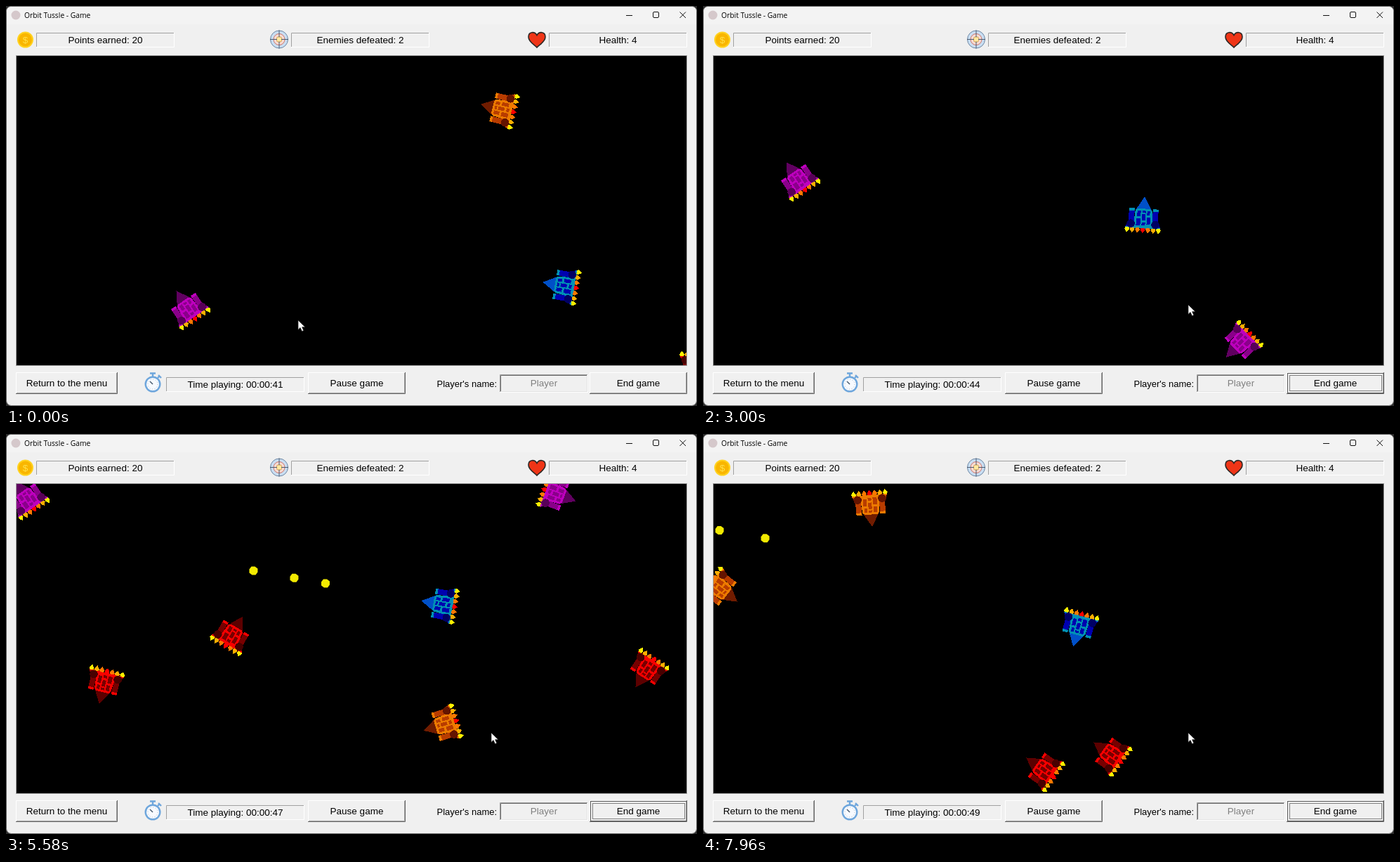
An HTML page that plays this animation: 984x569 px, repeating every 8 s.

```html
<!DOCTYPE html>
<html lang="en">
<head>
<meta charset="utf-8">
<title>Orbit Tussle - Game</title>
<style>
  html, body { margin: 0; width: 100%; height: 100%; overflow: hidden; background: #2b2b2b; }
  svg { display: block; }
  text { font: 13.5px "Liberation Sans", Arial, sans-serif; }
  .title { font: 10.3px "Open Sans", sans-serif; }
  .small { font-size: 13px; }
  .mid { text-anchor: middle; }
  .red    { --pod: #780000; --line: #f60000; --nose: #5c0000; --dark: #480000; }
  .orange { --pod: #b83c00; --line: #ec7a00; --nose: #701c00; --dark: #641400; }
  .purple { --pod: #8a008a; --line: #be00be; --nose: #600060; --dark: #580058; }
  .blue   { --pod: #0000b0; --line: #0090b4; --nose: #0050c8; --dark: #000064; }
</style>
</head>
<body>
<svg width="984" height="569" viewBox="0 0 984 569">
  <defs>
    <clipPath id="space"><rect x="15" y="71" width="954" height="440"/></clipPath>
    <g id="ship" shape-rendering="crispEdges">
      <path fill="var(--nose)" d="M0-26.500L12-6H-12z"/>
      <path fill="var(--pod)" d="M-21-8h8V18h-12l4-9zM21-8h-8V18h12l-4-9z"/>
      <path fill="var(--line)" d="M-21-9h8v3.500h-8zM13-9h8v3.500h-8z"/>
      <path fill="var(--line)" d="M-9-9H9L12-6L14 18H-14L-12-6zM-25 17h50v2h-50z"/>
      <path fill="var(--pod)" d="M-9-6h5v8h-5zM-10 5h6v10h-6zM-2-6h5v3h-5zM-2-1h5v9h-5zM-2 11h5v4h-5zM5-6h4v6h-4zM5 3h5v10h-5z"/>
      <circle cx="-17.500" cy="13" r="5.800" fill="var(--dark)"/>
      <circle cx="17.500" cy="13" r="5.800" fill="var(--dark)"/>
      <g id="flames"></g>
    </g>
  </defs>

  <rect x=".5" y=".5" width="983" height="568" rx="7" fill="#f0f0f0" stroke="#606060"/>
  <path d="M1 26V8q0-7 7-7h968q7 0 7 7v18z" fill="#f3f3f3"/>
  <circle cx="14" cy="13" r="6.500" fill="#d5c8cb"/>
  <text class="title" x="26" y="17">Orbit Tussle - Game</text>
  <g fill="none" stroke="#111">
    <path d="M883 13.500h9M959.500 8.500l8.500 8.500M968 8.500l-8.500 8.500"/>
    <rect x="921.500" y="8.500" width="8" height="8" rx="1.500"/>
  </g>

  <circle cx="27.500" cy="48" r="11.500" fill="#ffd21f"/>
  <circle cx="27.500" cy="48" r="9.500" fill="#f9b600"/>
  <text class="mid" x="27.500" y="53" fill="#ffe04a">$</text>

  <g fill="none">
    <circle cx="389" cy="47.500" r="12.500" fill="#c9def2" stroke="#6b86a3"/>
    <circle cx="389" cy="47.500" r="8" fill="#f5dcd5" stroke="#cf7468"/>
    <circle cx="389" cy="47.500" r="4" fill="#ffe9a0" stroke="#d4a05a"/>
    <path d="M389 34.500v10m0 6v10M376 47.500h10m6 0h10" stroke="#4a5b70"/>
  </g>

  <path d="M756 59C752 54.500 744 51 744 44C744 36 753 36 756 41.500C759 36 768 36 768 44C768 51 760 54.500 756 59z"
        fill="#ef3517" stroke="#2d2825" stroke-width="1.600"/>

  <g stroke="#6ea6dc" fill="none" stroke-width="2.400">
    <path d="M209 527v-4m-4-.5h8M216 529l3-3m-2-1l4 4"/>
    <circle cx="209" cy="538" r="10.300" fill="#f7faff"/>
    <path d="M209 538l-4-4" stroke="#44566b" stroke-width="1.500"/>
    <circle cx="209" cy="538" r="7" stroke="#a8b8c8" stroke-width="1" stroke-dasharray="1 2.660"/>
  </g>

  <g id="controls"></g>
  <text class="small" x="613.500" y="542">Player's name:</text>
  <g id="focus" fill="none">
    <rect x="832.500" y="522.500" width="137" height="28" stroke="#555"/>
    <rect x="835.500" y="525.500" width="131" height="22" stroke="#111" stroke-dasharray="1 1"/>
  </g>

  <rect x="14.500" y="70.500" width="955" height="441" stroke="#a0a0a0"/>
  <g clip-path="url(#space)">
    <g id="shots" fill="#f2ea00"></g>
    <g id="fleet"></g>
  </g>
  <path id="cursor" fill="#fff" stroke="#222" stroke-width=".7" d="M0 0V13.500L3 10.600L5.500 15.700L7.800 14.700L5.600 9.800H10z"/>
</svg>

<script>
const LOOP = 8000, TICK = 1000 / 24;
const $ = id => document.getElementById(id);
const toTick = ms => Math.floor((ms + 3) / TICK) * TICK;

function bevel(x, y, w, h, topLeft, bottomRight) {
  return `<path fill="none" stroke="${topLeft}" d="M${x + .5} ${y + h}V${y + .5}H${x + w}"/>
    <path fill="none" stroke="${bottomRight}" d="M${x} ${y + h - .5}H${x + w - .5}V${y}"/>`;
}
const label = (x, y, text, attrs = '') => `<text class="mid" x="${x}" y="${y}" ${attrs}>${text}</text>`;
const field = (x, y, text, id = '') =>
  bevel(x, y, 197, 21, '#a0a0a0', '#fff') + label(x + 98.5, y + 15, text, id && `id="${id}"`);
const button = (x, w, text) => bevel(x, 521, w, 31, '#fff', '#696969') +
  bevel(x + 1, 522, w - 2, 29, '#f0f0f0', '#a0a0a0') + label(x + w / 2, 541, text);

$('controls').innerHTML =
  field(43, 38, 'Points earned: 20') + field(406, 38, 'Enemies defeated: 2') + field(773, 38, 'Health: 4') +
  field(228, 528, '', 'clock') +
  button(14, 145, 'Return to the menu') + button(430, 139, 'Pause game') + button(831, 139, 'End game') +
  bevel(703, 524, 126, 26, '#a0a0a0', '#fff') + bevel(704, 525, 124, 24, '#696969', '#e3e3e3') +
  label(766, 541, 'Player', 'fill="#808080"');

const flameColors = ['#ff0000', '#ff7800', '#ffae00', '#fff000'];
for (let i = -3; i <= 3; i++) {
  const x = i * 7.5;
  $('flames').innerHTML += `<path fill="${flameColors[Math.abs(i)]}" d="M${x - 3.5} 21l1-2.500h5l1 2.500L${x} 26z"/>`;
}

// Each enemy: colour, moment, nose position then, velocity per second, optional end.
const enemies = [
  ['purple', 0, 243, 406, -41.3, -61],
  ['orange', 0, 677, 140, -152, -35.5],
  ['red', 0, 985, 542, 0, 150],
  ['red', 1380, 113, 139, -65, 189, 1850],
  ['orange', 1380, 33, 237, 85, -98, 1850],
  ['red', 2250, 959, 408, 116, -99],
  ['purple', 2250, 837, 409, -122, 120],
  ['red', 2250, 1020, 484, 106, -106],
  ['orange', 3880, 365, 516, -295, -52, 4600],
  ['orange', 4880, 762, 371, -249, 76],
  ['red', 4880, 167, 243, -51, 210],
  ['red', 4880, 269, 376, 101, -173],
  ['red', 4880, 939, 296, -63, 95],
  ['red', 4880, 180, 516, 197, 155],
  ['purple', 6250, 877, 120, 94, 35],
  ['red', 7960, 461, 461, -123, -86],
  ['red', 7960, 557, 439, -122, -88],
  ['orange', 7960, 241, 131, 9, 100],
  ['orange', 7960, 48, 238, 95, 74]
].map(([color, at, x, y, vx, vy, end = LOOP]) => ({ node: addShip(color), at: toTick(at), x, y, vx, vy, end }));

// Time, x, y, heading in degrees clockwise from up.
const playerPath = [
  [0, 790.6, 397.4, -80], [1375, 797.6, 400.4, -80], [1500, 797.6, 400.4, -80], [2250, 689.6, 380.4, -80],
  [2500, 652, 362, -49], [2800, 628, 326, -17], [3100, 627, 283, 14], [3450, 640, 247, 45],
  [4050, 640, 247, 45], [4500, 626, 243.4, -80], [4850, 620.6, 242.4, -80], [5500, 620.6, 242.4, -80],
  [5900, 590.6, 237.4, -80], [6400, 590.6, 237.4, -80], [6900, 568, 242, -108], [7300, 545, 257, -137],
  [7700, 534, 277, -165], [LOOP, 534, 277, -165]
];
const cursorPath = [[0, 416, 447], [1375, 636, 398], [1900, 691, 425], [LOOP, 691, 425]];
const player = addShip('blue');

// Shots share one line of fire; the values are x positions at 6250 ms.
const shots = [149.5, 207.5, 252, 418, 476, 513, 578].map(x => {
  const node = add('shots', 'path');
  node.setAttribute('d', 'M-3-6H2L6-3V2L3 6H-2L-6 3V-2z');
  return { node, x };
});

function add(parent, tag) {
  return $(parent).appendChild(document.createElementNS('http://www.w3.org/2000/svg', tag));
}
function addShip(color) {
  const node = add('fleet', 'use');
  node.setAttribute('href', '#ship');
  node.setAttribute('class', color);
  return node;
}
function place(node, x, y, angle = 0) {
  node.setAttribute('transform', `translate(${x} ${y}) rotate(${angle})`);
}
function show(node, visible) {
  node.style.display = visible ? '' : 'none';
}
function along(path, t) {
  const i = Math.max(1, path.findIndex(key => key[0] >= t));
  const a = path[i - 1], b = path[i], k = (t - a[0]) / (b[0] - a[0]);
  return a.slice(1).map((v, j) => v + (b[j + 1] - v) * k);
}

function draw(now) {
  const t = toTick(now % LOOP) % LOOP;

  for (const { node, at, x, y, vx, vy, end } of enemies) {
    const s = (t - at) / 1000, speed = Math.hypot(vx, vy);
    place(node, x + vx * s - 25.5 * vx / speed, y + vy * s - 25.5 * vy / speed,
      Math.atan2(vx, -vy) * 180 / Math.PI);
    show(node, t < end);
  }

  const pose = along(playerPath, t);
  place(player, ...pose);
  for (const shot of shots) {
    const x = shot.x - (t - 6250) * .2865;
    place(shot.node, x, 159 + (x - 149.5) * .175);
    show(shot.node, x <= pose[0] - 17);
  }

  place($('cursor'), ...along(cursorPath, t));
  show($('focus'), t >= 400);
  $('clock').textContent = `Time playing: 00:00:${42 + Math.floor((t - 100) / 1000)}`;
}

let start;
function tick(now) {
  start ??= now;
  draw(now - start);
  requestAnimationFrame(tick);
}
draw(0);
requestAnimationFrame(tick);
</script>
</body>
</html>
```
